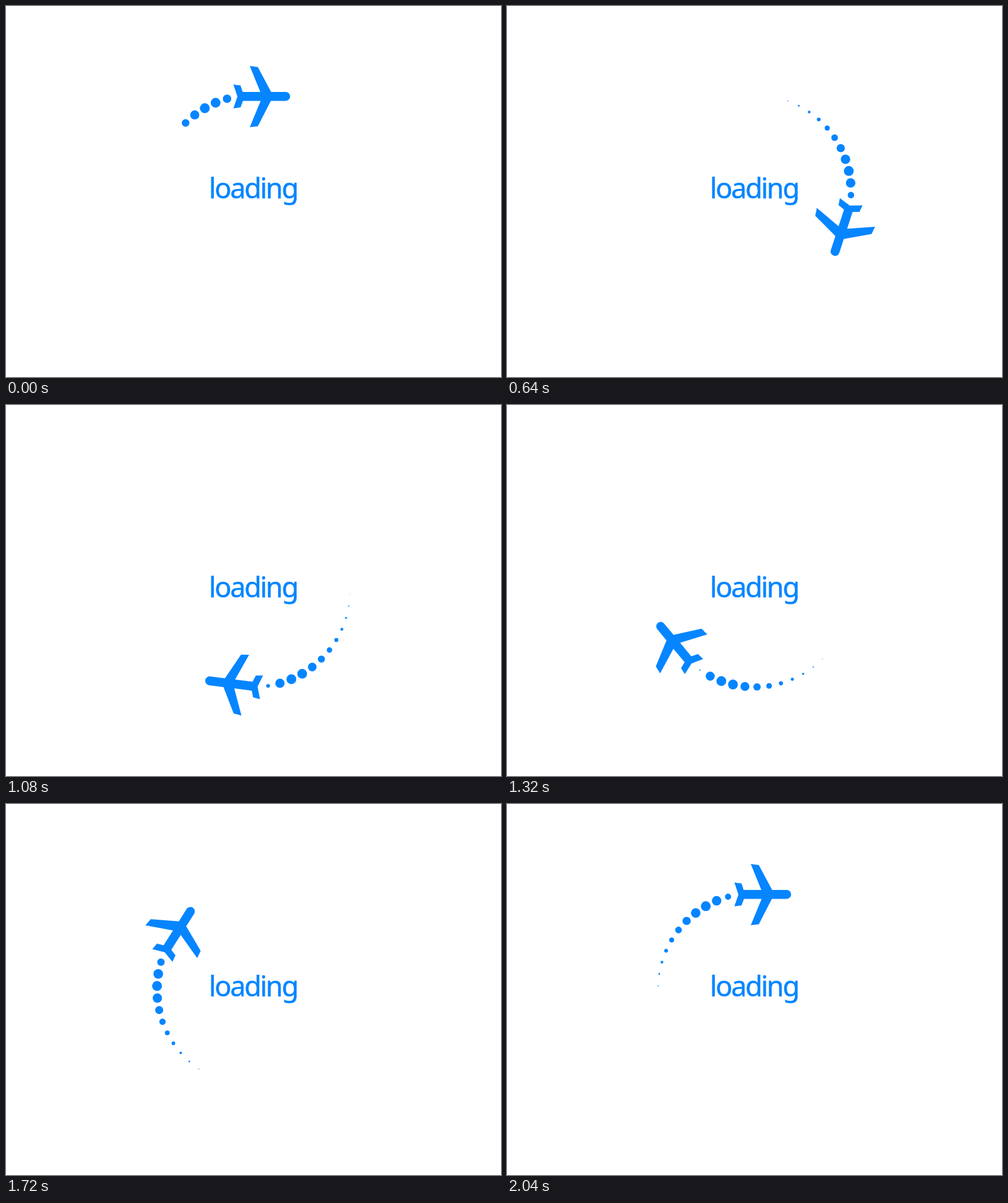
An HTML page with a canvas for the animation above (2.08 s loop, 800 by 600 pixels).

```html
<!DOCTYPE html>
<html lang="en">
<head>
<meta charset="utf-8">
<title>Loading</title>
<style>
  html, body { margin: 0; height: 100%; overflow: hidden; background: #fff; }
  canvas { display: block; }
</style>
</head>
<body>
<canvas id="stage" width="800" height="600"></canvas>
<script>
const ctx = document.getElementById('stage').getContext('2d');
const BLUE = '#0585ff';
const FRAME = 40, FRAMES = 52;
const STEP = Math.PI / 25;              // 50 dots on the ring
const FIRST = -15.9 * Math.PI / 180;    // angle of dot 0, from the top
const RING = 156;
const FADE = [16, 14.5, 12, 9.3, 6.9, 5.1, 3.5, 2.2, 1.1, 0];  // diameters from age 3 on

// Plane heading right, relative to the ring's centre
const plane = new Path2D(
  'M52 -161 A7.2 7.2 0 0 1 52 -146.6 H28 L7 -105.5 L-6 -104 L11.5 -146.6' +
  'H-17 L-21 -136 L-32.5 -134.5 L-26 -153.5 L-32.5 -173 L-21 -171.5 L-17.5 -161' +
  'H11 L-6 -203 L7 -201.2 L28.5 -161 Z');

function dotSize(age) {
  if (age < 3) return 16 * (1 - Math.exp(-2.3 * age));
  const i = Math.floor(age - 3), f = age - 3 - i;
  return i >= FADE.length - 1 ? 0 : FADE[i] + (FADE[i + 1] - FADE[i]) * f;
}

function drawDots(step, phase) {
  for (let j = 0; j < 12 && step - j >= -4; j++) {
    const a = FIRST + (step - j) * STEP;
    ctx.beginPath();
    ctx.arc(RING * Math.sin(a), -RING * Math.cos(a), dotSize(j + phase) / 2, 0, 7);
    ctx.fill();
  }
}

function drawLabel() {
  ctx.font = '45px "Noto Sans", "Open Sans", sans-serif';
  ctx.letterSpacing = '-2.3px';
  ctx.lineWidth = 0.5;
  ctx.fillText('loading', 328, 311);
  ctx.strokeText('loading', 328, 311);
}

function draw(now) {
  const n = Math.floor(now / FRAME) % FRAMES;
  const step = Math.max(0, n - 1);
  // The trail's growth drifts slightly against the plane's steps
  let phase = 0.84 - 0.0235 * n;
  if (phase < 0) phase += 0.78;

  ctx.clearRect(0, 0, 800, 600);
  ctx.fillStyle = ctx.strokeStyle = BLUE;
  drawLabel();
  ctx.save();
  ctx.translate(400, 300);
  drawDots(step, phase);
  ctx.rotate(step * STEP);
  ctx.fill(plane);
  ctx.restore();
}

const start = performance.now();
function tick() {
  draw(performance.now() - start);
  requestAnimationFrame(tick);
}
tick();
</script>
</body>
</html>
```
